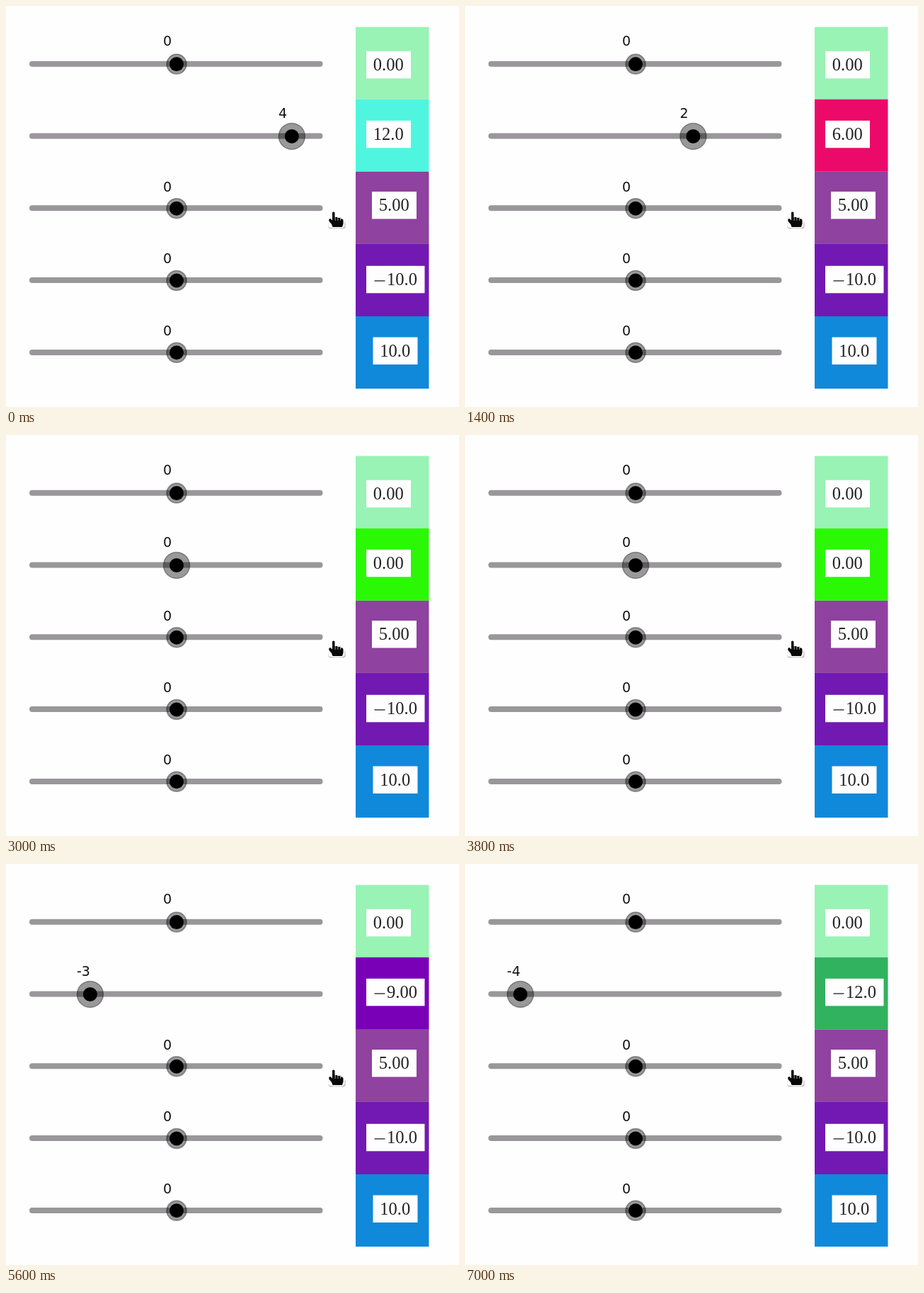
An HTML page with a canvas for the animation above (7.6 s loop, 640 px wide and 566 px high).

```html
<!DOCTYPE html>
<html lang="en">
<head>
<meta charset="utf-8">
<title>Sliders</title>
<style>
html, body { margin: 0; width: 100%; height: 100%; overflow: hidden; background: #fefefe; }
canvas { display: block; }
</style>
</head>
<body>
<canvas id="stage" width="640" height="566"></canvas>
<script>
const ctx = document.getElementById('stage').getContext('2d');
const LOOP = 7600;
const TRACK = { left: 37, right: 443.5, mid: 241, unit: 40.7, top: 81.7, pitch: 101.8 };
const TILE = { left: 494, width: 103.5, top: 29.6, pitch: 102.1 };

// The second slider jumps to a new value, and its tile takes a new colour.
const steps = [
  { at: 0, value: 4, color: '#50f5df' },
  { at: 200, value: 3, color: '#aa008c' },
  { at: 1400, value: 2, color: '#eb0a69' },
  { at: 2400, value: 1, color: '#a08a5a' },
  { at: 3000, value: 0, color: '#2bf805' },
  { at: 4000, value: -1, color: '#5a9a80' },
  { at: 4600, value: -2, color: '#44638b' },
  { at: 5200, value: -3, color: '#7a00b8' },
  { at: 6200, value: -4, color: '#30b25e' }
];

const rows = [
  { label: 56, boxX: 509, boxY: 63.7, result: 0, color: '#98f3b5' },
  { label: 157.8, boxX: 509, boxY: 161.8, active: true },
  { label: 261.5, boxX: 517, boxY: 262, result: 5, color: '#8f429f' },
  { label: 363.3, boxX: 509, boxY: 366.8, result: -10, color: '#7219b3' },
  { label: 465.2, boxX: 518.5, boxY: 467.5, result: 10, color: '#1089da' }
];

function disc(x, y, r, fill) {
  ctx.beginPath();
  ctx.arc(x, y, r, 0, Math.PI * 2);
  ctx.fillStyle = fill;
  ctx.fill();
}

function drawSlider(row, index, value) {
  const x = TRACK.mid + value * TRACK.unit;
  const y = TRACK.top + index * TRACK.pitch;
  ctx.strokeStyle = '#999799';
  ctx.lineWidth = 8;
  ctx.lineCap = 'round';
  ctx.beginPath();
  ctx.moveTo(TRACK.left, y);
  ctx.lineTo(TRACK.right, y);
  ctx.stroke();

  disc(x, y + 0.4, row.active ? 18.5 : 14, 'rgba(0,0,0,.4)');
  ctx.strokeStyle = 'rgba(0,0,0,.36)';
  ctx.lineWidth = 1.5;
  ctx.stroke();
  disc(x, y + 0.4, 10, '#000');

  ctx.fillStyle = '#111';
  ctx.font = '19px "DejaVu Sans", sans-serif';
  ctx.fillText(String(value), x - 18.9, row.label);
}

function drawTile(row, index, result, color) {
  ctx.fillStyle = color;
  ctx.fillRect(TILE.left, TILE.top + index * TILE.pitch, TILE.width, TILE.pitch);

  const negative = result < 0;
  ctx.fillStyle = '#fefefe';
  ctx.fillRect(row.boxX, row.boxY, negative ? 82.5 : 63, 38.5);

  const size = Math.abs(result);
  const base = row.boxY + 27.3;
  ctx.fillStyle = '#222';
  ctx.font = '24.5px "Liberation Serif", "Times New Roman", serif';
  ctx.fillText(size.toFixed(size < 10 ? 2 : 1), row.boxX + (negative ? 29 : 9.8), base);
  if (negative) ctx.fillRect(row.boxX + 11.5, base - 6.8, 15, 1.3);
}

function drawCursor() {
  // pale plate with a grey lower rim
  ctx.fillStyle = '#b4b4b4';
  ctx.beginPath();
  ctx.roundRect(455.5, 304, 24, 10.2, 3);
  ctx.fill();
  ctx.fillStyle = '#fefefe';
  ctx.beginPath();
  ctx.roundRect(455.5, 300, 23, 13, 3);
  ctx.fill();

  const hand = new Path2D('M461 291.5Q462.5 289.5 464.5 291.5V298H468L468.5 299H472' +
    'L472.5 300.5H475Q476.5 301 476.5 303V307.5L475 312H461.5L460 308L456.5 304' +
    'Q455.5 300.5 458 300L461 302.5Z');
  ctx.lineJoin = 'round';
  ctx.strokeStyle = '#fefefe';
  ctx.lineWidth = 3;
  ctx.stroke(hand);
  ctx.fillStyle = '#080808';
  ctx.fill(hand);
  ctx.fillStyle = '#aaa';
  for (const x of [464.7, 468.4, 472.1]) ctx.fillRect(x, 298, 0.9, 5);
}

function draw(time) {
  const step = steps.findLast(s => s.at <= time);
  ctx.fillStyle = '#fefefe';
  ctx.fillRect(0, 0, 640, 566);
  rows.forEach((row, i) => {
    drawSlider(row, i, row.active ? step.value : 0);
    if (row.active) drawTile(row, i, step.value * 3, step.color);
    else drawTile(row, i, row.result, row.color);
  });
  drawCursor();
}

const start = performance.now();
function tick() {
  draw((performance.now() - start) % LOOP);
  requestAnimationFrame(tick);
}
tick();
</script>
</body>
</html>
```
